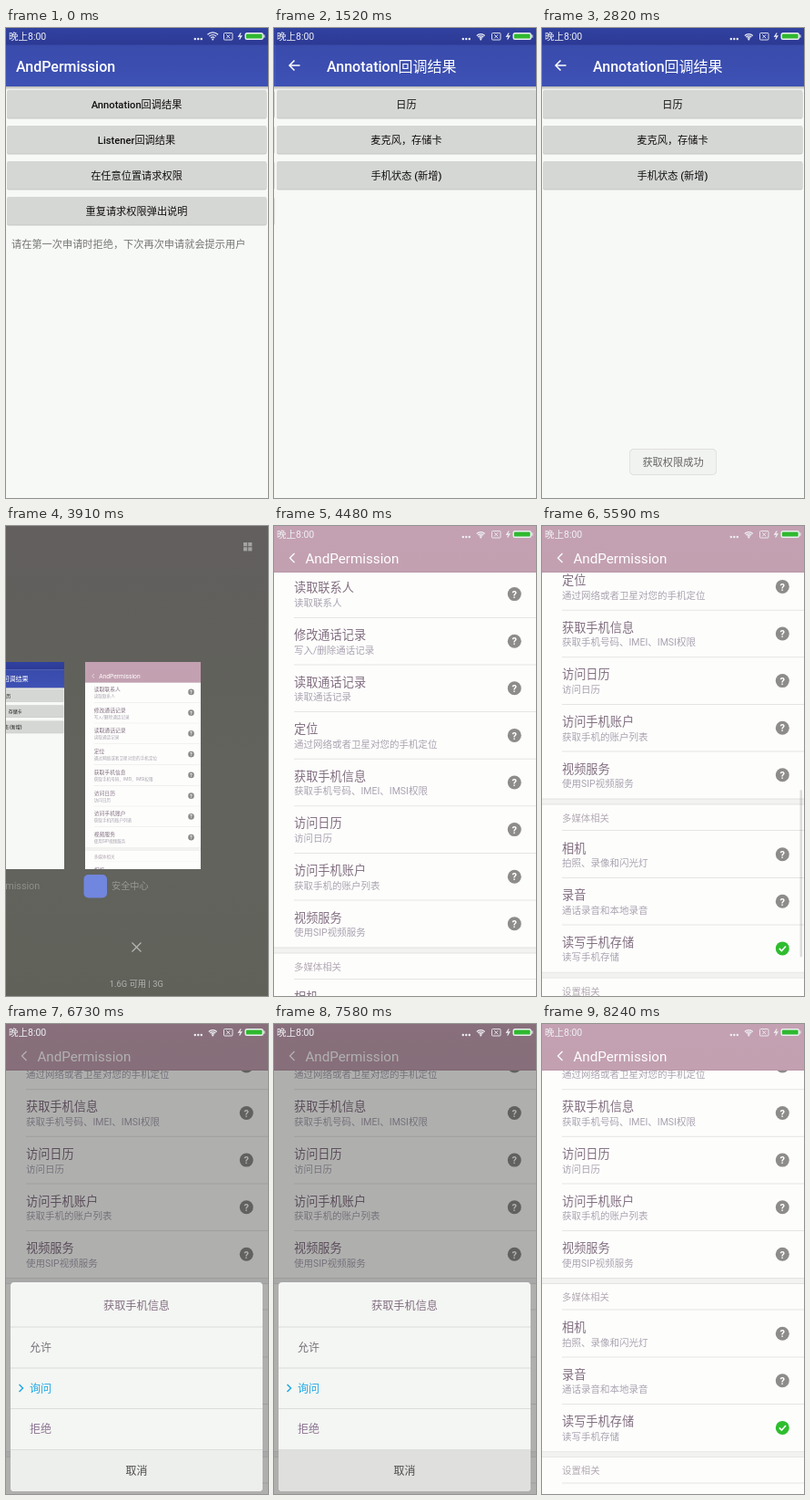
Recreate the animation shown at these times as an HTML page with a canvas. Size 288 by 515 pixels, loop 8600 ms.

```html
<!DOCTYPE html>
<html lang="zh-CN">
<head>
<meta charset="utf-8">
<title>AndPermission</title>
<style>
html, body { margin: 0; width: 100%; height: 100%; overflow: hidden; background: #f7f9f6; }
canvas { display: block; width: 288px; height: 515px; }
</style>
</head>
<body>
<canvas></canvas>
<script>
const W = 288, H = 515, LOOP = 8600, CARD = 127 / W;
const canvas = document.querySelector('canvas');
const c = canvas.getContext('2d');
const dpr = window.devicePixelRatio || 1;
canvas.width = W * dpr;
canvas.height = H * dpr;

// The screen refreshes in bursts: first change, last change, number of changes.
const bursts = [[250, 400, 2], [860, 1760, 8], [2010, 2820, 7], [3460, 4480, 8],
  [4630, 5590, 8], [5710, 6730, 9], [7460, 8240, 7]];

function held(t) {
  let shown = 0;
  for (const [a, b, n] of bursts) {
    const step = (b - a) / (n - 1);
    if (t >= a) shown = Math.min(b, a + Math.floor((t - a) / step + 1e-6) * step);
  }
  return shown;
}

const mix = (a, b, k) => a + (b - a) * k;

// Linear keyframes given as time, value, time, value...
function track(t, ...keys) {
  if (t <= keys[0]) return keys[1];
  for (let i = 2; i < keys.length; i += 2)
    if (t <= keys[i]) return mix(keys[i - 1], keys[i + 1], (t - keys[i - 2]) / (keys[i] - keys[i - 2]));
  return keys[keys.length - 1];
}

function rect(x, y, w, h, fill, r = 0) {
  c.fillStyle = fill;
  c.beginPath();
  c.roundRect(x, y, w, h, r);
  c.fill();
}

function disc(x, y, r, fill) {
  c.fillStyle = fill;
  c.beginPath();
  c.arc(x, y, r, 0, 7);
  c.fill();
}

function line(color, width, ...p) {
  c.strokeStyle = color;
  c.lineWidth = width;
  c.beginPath();
  for (let i = 0; i < p.length; i += 2) c.lineTo(p[i], p[i + 1]);
  c.stroke();
}

// y is the visual middle of the text.
function text(s, x, y, size, color, align = 'left', weight = 400) {
  c.font = `${weight} ${size}px Roboto, "Noto Sans CJK SC", "Noto Sans CJK", sans-serif`;
  c.textAlign = align;
  c.fillStyle = color;
  c.fillText(s, x, y + size * 0.37);
}

function gradient(y0, y1, ...colors) {
  const g = c.createLinearGradient(0, y0, 0, y1);
  colors.forEach((color, i) => g.addColorStop(i / (colors.length - 1), color));
  return g;
}

function layer(alpha, x, y, scale, draw) {
  if (alpha <= 0) return;
  c.save();
  c.globalAlpha *= alpha;
  c.translate(x, y);
  c.scale(scale, scale);
  draw();
  c.restore();
}

function statusBar(t) {
  const white = '#eef0f4';
  text('晚上8:00', 3, 9.3, 10.5, white);
  for (const x of [207.8, 211.3, 214.8]) disc(x, 12, 1.2, white);
  c.strokeStyle = white;
  c.lineWidth = 1.2;
  const reach = t < 250 ? 8.2 : 6.3;
  for (const k of [0.35, 0.67, 1]) {
    c.beginPath();
    c.arc(227.3, 13, reach * k, -Math.PI * 0.75, -Math.PI * 0.25);
    c.stroke();
  }
  disc(227.3, 12.6, 1, white);
  c.lineWidth = 0.9;
  c.beginPath();
  c.roundRect(239.5, 5.5, 9.5, 7.5, 1);
  c.stroke();
  line(white, 0.9, 242.2, 7.2, 246.3, 11.3);
  line(white, 0.9, 246.3, 7.2, 242.2, 11.3);
  line(white, 1.2, 258.2, 5.5, 255.8, 9.2, 258.8, 8.8, 256.6, 12.5);
  rect(262.5, 5, 20.5, 8, white, 2.5);
  rect(263.9, 6.4, 17.7, 5.2, '#2fb82f', 1.2);
  rect(283.3, 7.3, 1.2, 3.4, white, 0.5);
}

function demoPage(title, titleX, labels, pressed) {
  rect(0, 0, W, H, '#f7f9f6');
  rect(0, 64, W, 4, gradient(64, 68, 'rgba(0,0,0,.28)', 'rgba(0,0,0,0)'));
  rect(0, 0, W, 19, gradient(0, 19, '#3041a0', '#2d3a94'));
  rect(0, 18.5, W, 45.5, gradient(18, 64, '#394bab', '#3e51b5'));
  text(title, titleX, 42, 16, '#fff', 'left', 500);
  labels.forEach((label, i) => {
    const y = 68 + i * 39;
    rect(1, y + 1, 285.5, 30.4, 'rgba(0,0,0,.2)', 2);
    rect(1, y, 285.5, 30.4, i === pressed ? '#bbbdba' : '#d5d7d4', 2);
    text(label, 143.5, y + 16, 11.2, '#111', 'center', 500);
  });
}

function mainPage(t) {
  demoPage('AndPermission', 11,
    ['Annotation回调结果', 'Listener回调结果', '在任意位置请求权限', '重复请求权限弹出说明'],
    t >= 860 && t < 1760 ? 0 : -1);
  text('请在第一次申请时拒绝，下次再次申请就会提示用户', 6, 237, 11.2, '#777876');
}

function annotationPage(t) {
  demoPage('Annotation回调结果', 56, ['日历', '麦克风，存储卡', '手机状态 (新增)'],
    t >= 2010 && t < 2400 ? 2 : -1);
  line('#fff', 1.5, 26.5, 41, 15.5, 41);
  line('#fff', 1.5, 20.5, 35.5, 15, 41, 20.5, 46.5);
}

function toast() {
  rect(96, 461, 96, 29, '#d9dbd8', 5);
  rect(96.7, 461.7, 94.6, 27.6, '#f1f3f0', 4.5);
  text('获取权限成功', 144, 475.5, 11.2, '#666', 'center');
}

const sections = [
  ['', ['读取联系人', '读取联系人'], ['修改通话记录', '写入/删除通话记录'],
    ['读取通话记录', '读取通话记录'], ['定位', '通过网络或者卫星对您的手机定位'],
    ['获取手机信息', '获取手机号码、IMEI、IMSI权限'], ['访问日历', '访问日历'],
    ['访问手机账户', '获取手机的账户列表'], ['视频服务', '使用SIP视频服务']],
  ['多媒体相关', ['相机', '拍照、录像和闪光灯'], ['录音', '通话录音和本地录音'],
    ['读写手机存储', '读写手机存储', true]],
  ['设置相关']
];

function permissionRow([title, note, allowed], y, pressed) {
  if (pressed) rect(0, y, W, 51.6, '#ebecea');
  text(title, 22, y + 18.8, 13.2, '#826e80');
  text(note, 22, y + 35.4, 10.5, '#aaa2b0');
  const cy = y + 25.8;
  disc(264.3, cy, 7.5, allowed ? '#2fbd2f' : '#8d8c8b');
  if (allowed) line('#fff', 1.6, 260.8, cy, 263.4, cy + 2.6, 268, cy - 2.4);
  else text('?', 264.3, cy + 0.2, 11, '#fff', 'center', 700);
}

function permissionPage(t) {
  const scroll = track(t, 4480, 2, 4630, 10, 5040, 61.6, 5310, 118, 5590, 165, 5965, 185.5);
  rect(0, 0, W, H, '#fdfefc');
  let y = 50.8 - scroll;
  for (const [heading, ...rows] of sections) {
    if (heading) {
      rect(0, y, W, 6.8, '#e3e3e1');
      rect(0, y + 0.8, W, 5.2, '#f2f3f1');
      text(heading, 22, y + 21.3, 10.4, '#b3a9b3');
      y += 35.3;
      rect(22, y - 1, W, 1, '#e5e5e3');
    }
    rows.forEach((row, i) => {
      permissionRow(row, y, row[0] === '获取手机信息' && t > 6090 && t < 6400);
      y += 51.6;
      if (i < rows.length - 1) rect(22, y - 0.5, W, 1, '#e5e5e3');
    });
  }
  const bar = t < 4630 ? 0 : track(t, 5590, 1, 6220, 0);
  layer(bar, 0, 0, 1, () => rect(283.5, 227 + scroll * 0.377, 2.5, 183, 'rgba(0,0,0,.13)', 1));
  rect(0, 0, W, 51, gradient(0, 51, '#c4a1b2', '#c2a0b0'));
  rect(0, 50.3, W, 0.7, '#b596a5');
  line('#fff', 1.3, 22.5, 30, 17.5, 35, 22.5, 40);
  text('AndPermission', 34.4, 35.5, 15.2, '#fff');
}

function dialog(t) {
  const edge = '#dcdedb';
  c.save();
  c.beginPath();
  c.roundRect(5, 283, 277, 229, 4);
  c.clip();
  rect(5, 283, 277, 229, '#f4f6f3');
  rect(5, 466, 277, 46, t >= 7460 ? '#dfe0de' : '#edefec');
  for (const y of [331.5, 376.5, 421, 466]) rect(5, y, 277, 1, edge);
  c.restore();
  text('获取手机信息', 143.5, 308, 12.2, '#826e80', 'center');
  text('允许', 26, 355, 12, '#77707a');
  text('询问', 26, 399.5, 12, '#20a8e8');
  text('拒绝', 26, 444, 12, '#8b7291');
  text('取消', 143.5, 490, 12, '#4c4c4c', 'center');
  line('#20a8e8', 1.5, 14.5, 395, 18.5, 399, 14.5, 403);
}

function card(x, open, page) {
  layer(1, mix(x, 0, open), mix(149, 0, open), mix(CARD, 1, open), () => {
    c.beginPath();
    c.rect(0, 0, W, H);
    c.clip();
    page();
  });
}

function recents(t) {
  const shrink = track(t, 3314, 0, 3460, 0.25, 3606, 0.65, 3751, 0.93, 3890, 1);
  const grow = track(t, 4050, 0, 4189, 0.4, 4334, 0.85, 4480, 1);
  rect(0, 0, W, H, gradient(0, H, '#625f5e', '#61605c', '#61635c', '#61635c', '#60625a'));
  layer(shrink * (1 - grow), 0, 0, 1, () => {
    for (const x of [261, 266.2]) for (const y of [18, 23.2]) rect(x, y, 4.2, 4.2, '#a3a3a1');
    text('AndPermission', -36, 394.5, 10.8, '#8f908b');
    rect(85.5, 382, 25.5, 25.5, '#7186de', 5);
    text('安全中心', 116, 394.5, 10.2, '#989994');
    line('#b9bab6', 1.1, 138.5, 456.5, 148.5, 466.5);
    line('#b9bab6', 1.1, 148.5, 456.5, 138.5, 466.5);
    text('1.6G 可用 | 3G', 143.3, 502, 9.4, '#b2b3af', 'center');
  });
  card(mix(-63, -150, grow), 1 - shrink, () => annotationPage(t));
  card(mix(W, 87, shrink), grow, () => permissionPage(t));
}

function draw(t) {
  if (t < 1760) {
    const x = track(t, 989, W, 1117, 215, 1246, 80, 1374, 18, 1500, 2, 1760, 0);
    layer(1, x - W, 0, 1, () => mainPage(t));
    if (x < W) layer(1, x, 0, 1, () => annotationPage(t));
  } else if (t < 3460) annotationPage(t);
  else if (t < 4480) recents(t);
  else {
    permissionPage(t);
    const shade = track(t, 6340, 0, 6475, 0.5, 6602, 0.9, 6730, 1, 7720, 1, 7850, 0.65, 7980, 0.25, 8110, 0);
    if (shade > 0) {
      rect(0, 0, W, H, `rgba(0,0,0,${0.31 * shade})`);
      layer(1, 0, 232 * (1 - shade), 1, () => dialog(t));
    }
  }
  layer(track(t, 2280, 0, 2820, 1, 3314, 1, 3751, 0), 0, 0, 1, toast);
  if (t < 3460 || t >= 4480) statusBar(t);
}

function frame(now) {
  c.setTransform(dpr, 0, 0, dpr, 0, 0);
  draw(held(now % LOOP));
  requestAnimationFrame(frame);
}
requestAnimationFrame(frame);
</script>
</body>
</html>
```
